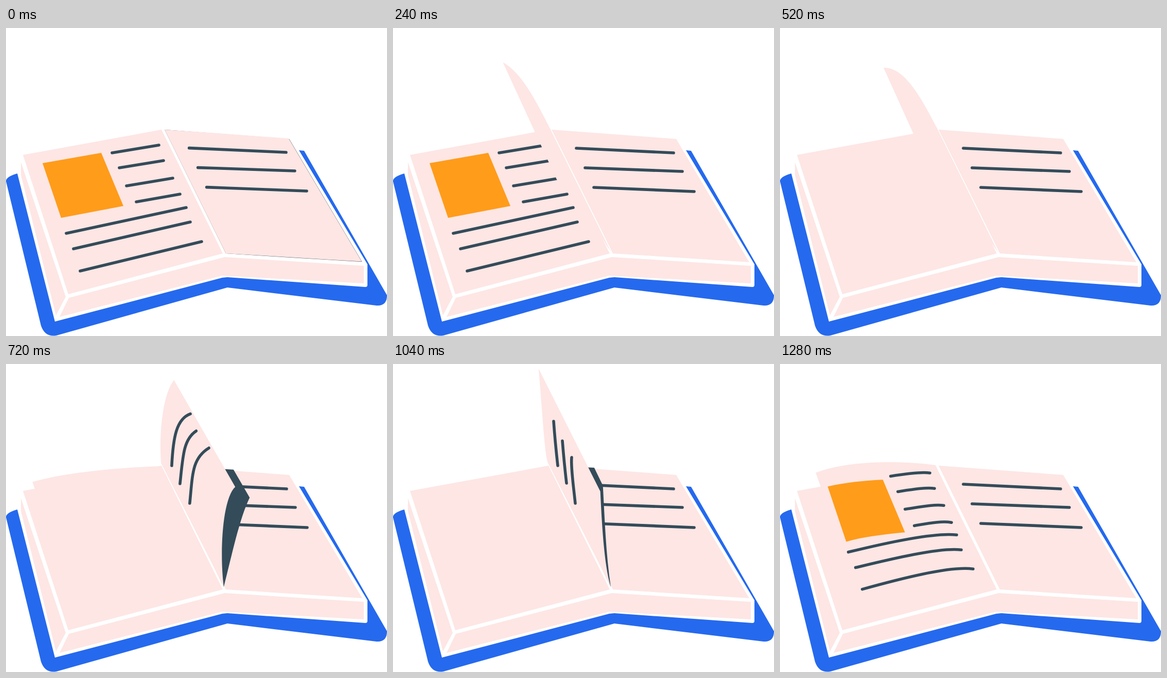
Write an HTML page without scripts that moves like this. It is 740 px wide and 597 px high and loops after 1.32 s.

```html
<!DOCTYPE html>
<html lang="en">
<head>
<meta charset="utf-8">
<title>Turning pages</title>
<style>
  :root { --paper: #fde6e4; --ink: #344b59; --blue: #2569ee; --accent: #ff9c1a; }
  html, body { margin: 0; width: 100%; height: 100%; overflow: hidden; background: #fff; }
  svg { display: block; width: 740px; height: 597px; }

  .paper { fill: var(--paper); }
  .photo { fill: var(--accent); }
  .lines { fill: none; stroke: var(--ink); stroke-width: 5.6; stroke-linecap: round; }
  .shadow { fill: var(--ink); }

  /* Every sheet runs the same turn, started at its own --t. */
  .sheet, .sheet path { animation: 1320ms linear var(--t) infinite; }
  .sheet { opacity: 0; animation-name: show; animation-timing-function: step-end; }
  .sheet .paper { animation-name: turn; }
  .sheet .shadow { animation-name: shade, front; animation-timing-function: linear, step-end; }
  .sheet .text { animation-name: bend, front; animation-timing-function: linear, step-end; }
  .sheet .photo { animation-name: photo, back; animation-timing-function: linear, step-end; }
  .sheet .notes { animation-name: notes, back; animation-timing-function: linear, step-end; }
  .opening { animation: opening 1320ms step-end infinite; }

  @keyframes show { 0% { opacity: 1 } 35%, 100% { opacity: 0 } }
  @keyframes front { 0% { opacity: 1 } 15.5%, 100% { opacity: 0 } }
  @keyframes back { 0% { opacity: 0 } 17.8%, 100% { opacity: 1 } }
  @keyframes opening { 0% { opacity: 1 } 34.5%, 100% { opacity: 0 } }

  @keyframes turn {
    0% { d: path("M308 197C389 203 470 209 550 215L692 454C603 449 515 443 427 437Z") }
    6.82% { d: path("M304 194C330 148 382 124 458 128L588 321C520 307 475 345 427 431Z") }
    9.09% { d: path("M303 192C306 140 355 92 430 100L555 279C480 262 440 340 424 432Z") }
    12.12% { d: path("M301 192C297 130 305 55 328 32L447 238C420 260 415 370 423 432Z") }
    14.02% { d: path("M302 194C296 180 295 150 284 8L404 246C406 300 410 390 423 432Z") }
    18.94% { d: path("M306 196C270 125 240 75 202 76L310 314C350 318 380 375 424 435Z") }
    27.27% { d: path("M303 194C250 160 165 148 102 178L198 424C250 398 330 395 423 438Z") }
    32.2% { d: path("M302 196C250 188 140 183 70 210L165 475C235 440 340 420 418 434Z") }
    34.09% { d: path("M300 198C230 200 120 208 52 228L142 495C230 465 330 445 418 436Z") }
    36.4%, 100% { d: path("M301 197C212 213 122 229 33 246L121 516C220 490 320 463 418 437Z") }
  }
  @keyframes shade {
    0% { d: path("M308 197L550 215L692 454C603 449 515 443 427 437Z") }
    6.82% { d: path("M308 197L550 216L645 375C605 342 510 385 427 431Z") }
    9.09% { d: path("M308 197L550 215L620 331C585 297 505 355 424 432Z") }
    12.12% { d: path("M308 197L444 205L476 260C455 300 440 370 423 432Z") }
    14.02% { d: path("M308 197L392 201L409 236C412 300 414 370 423 432Z") }
    18.94%, 100% { d: path("M308 197L312 198L318 218C350 280 385 350 423 432Z") }
  }
  @keyframes bend {
    0% { d: path("M356 233C419 236 482 239 545 242M373 271C436 273 499 276 562 278M390 309C455 312 520 314 585 317") }
    6.82% { d: path("M325 203C360 170 395 142 455 153M340 239C375 208 400 178 467 183M360 277C400 242 430 220 501 225") }
    9.09% { d: path("M323 198C345 150 380 118 430 130M338 235C365 180 395 152 443 159M359 274C390 208 425 185 472 196") }
    12.12% { d: path("M322 197C325 140 332 105 360 96M338 232C344 178 345 145 371 129M357 270C363 212 362 182 396 162") }
    14.02%, 100% { d: path("M320 197C317 170 314 140 312 111M337 231C334 205 331 175 329 149M354 270C351 240 345 200 347 181") }
  }
  @keyframes photo {
    0%, 18.94% { d: path("M224 92C236 94 250 106 264 128L304 212C294 200 284 190 268 188Z") }
    27.27% { d: path("M139 180C165 172 195 174 219 186L259 276C235 266 205 267 178 278Z") }
    32.2% { d: path("M93 237C130 229 160 226 200 224L243 326C200 330 160 335 129 344Z") }
    36.4%, 100% { d: path("M71 262C109 256 147 249 185 242L228 345C188 352 147 360 107 368Z") }
  }
  @keyframes notes {
    0%, 18.94% { d: path("M278 152C288 168 298 188 306 206M291 182C301 198 310 216 317 232M305 214C314 230 324 248 333 265M320 246C330 262 340 282 348 300M274 210C310 222 335 275 352 322M286 236C320 248 345 302 362 350M300 276C335 288 360 340 384 390") }
    27.27% { d: path("M240 195C260 198 285 204 300 210M253 224C272 228 295 236 311 242M268 258C287 262 308 268 328 276M286 290C304 294 325 302 343 310M178 308C225 288 300 302 348 330M190 336C240 316 310 330 358 358M204 376C255 358 330 366 380 396") }
    32.2% { d: path("M215 217C240 213 275 208 291 211M229 247C255 243 285 238 300 241M243 281C270 277 300 271 318 274M261 313C285 309 315 303 333 307M133 364C190 350 300 325 343 331M147 394C205 380 310 354 352 360M160 436C225 418 330 390 375 397") }
    36.4%, 100% { d: path("M206 242C236 237 267 232 297 227M220 271C249 266 277 262 306 257M234 306C264 301 294 296 324 291M253 337C281 332 310 327 338 322M117 398C195 381 272 365 350 348M131 428C207 411 282 393 358 376M144 471C222 452 301 433 380 414") }
  }
</style>
</head>
<body>
<svg viewBox="0 0 740 597">
  <!-- cover and page block -->
  <path fill="var(--blue)" d="M22 282Q0 288 0 297L68 577Q76 600 98 596L430 503L720 538Q740 539 740 518L579 238L569 237L400 400Z"/>
  <path fill="#fff" d="M22 282L95 569L420 484L430 483L698 502Q702 502 702 498L702 458L569 237L550 215L305 195L30 244Z"/>
  <path class="paper" d="M29 260L116 521L97 557L29 285Z"/>
  <path class="paper" d="M122 523L425 444L695 461V495L420 480L104 560Z"/>
  <path class="paper" d="M33 246L302 197L421 437L121 516Z"/>
  <path class="paper" d="M308 197L550 215L692 454L427 437Z"/>
  <path class="lines" d="M356 233L545 242M373 271L562 278M390 309L585 317"/>

  <g class="opening">
    <path class="photo" d="M71 262L185 242L228 345L107 368Z"/>
    <path class="lines" d="M206 242L297 227M220 271L306 257M234 306L324 291M253 337L338 322M117 398L350 348M131 428L358 376M144 471L380 414"/>
  </g>

  <g class="sheet" style="--t:0ms">
    <path class="shadow"/><path class="paper"/><path class="lines text"/>
  </g>
  <g class="sheet" style="--t:270ms">
    <path class="shadow"/><path class="paper"/><path class="lines text"/>
  </g>
  <g class="sheet" style="--t:560ms">
    <path class="shadow"/><path class="paper"/><path class="lines text"/>
  </g>
  <g class="sheet" style="--t:855ms">
    <path class="shadow"/><path class="paper"/><path class="lines text"/>
    <path class="photo"/><path class="lines notes"/>
  </g>
</svg>
</body>
</html>
```
